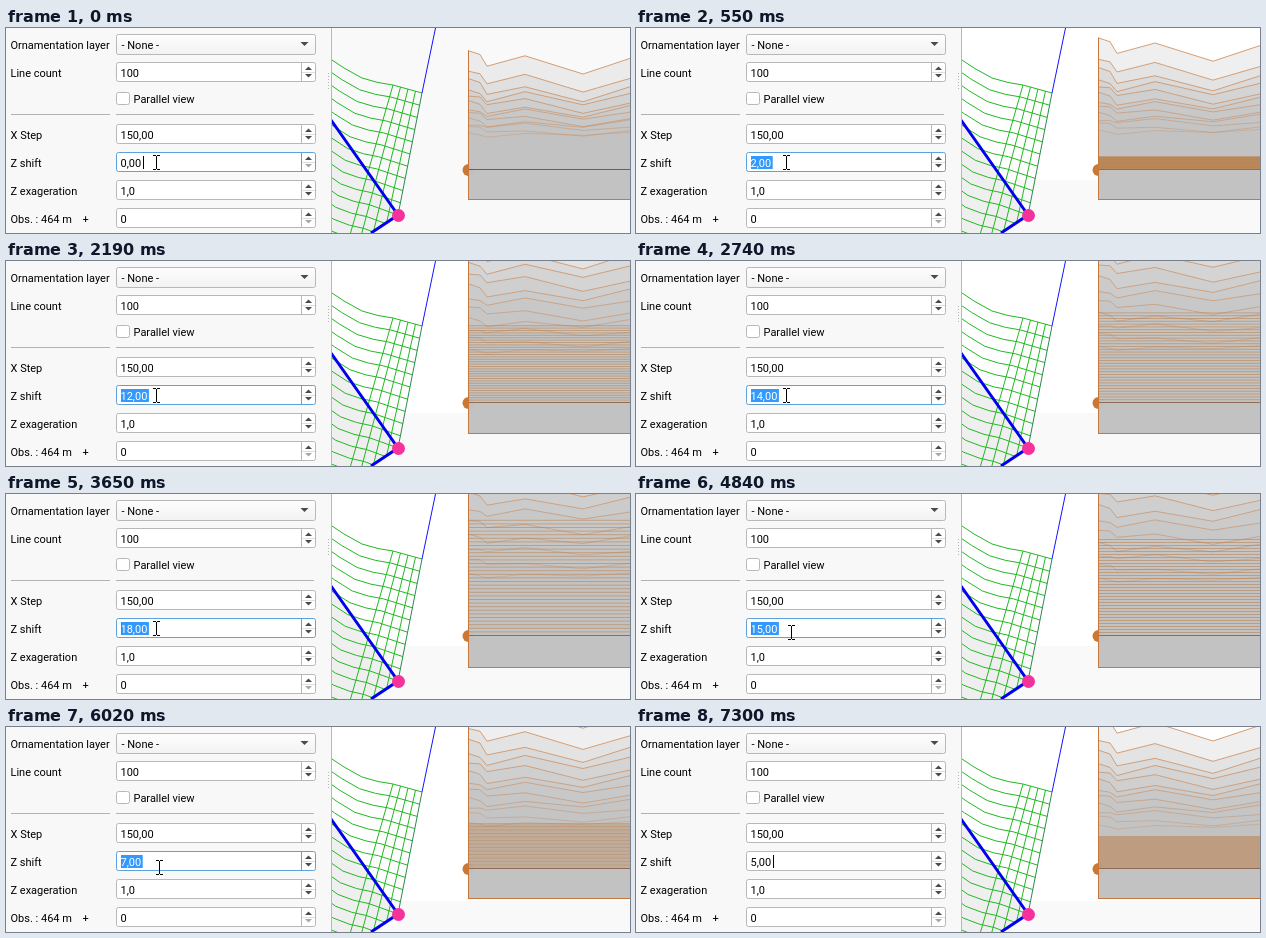
Recreate the animation shown at these times as an HTML page with a canvas. Size 624 by 205 pixels, loop 7400 ms.

```html
<!DOCTYPE html>
<html lang="en">
<head>
<meta charset="utf-8">
<title>Z shift</title>
<style>
html, body { margin: 0; width: 100%; height: 100%; overflow: hidden; background: #f8f8f8; }
canvas { display: block; width: 624px; height: 205px; }
</style>
</head>
<body>
<canvas id="stage" width="624" height="205"></canvas>
<script>
const ctx = document.getElementById('stage').getContext('2d');
const LOOP = 7400;
const TICK = 90;
const ORANGE = '#c8783c';
const GREEN = '#22b822';
const BORDER = '#b8b8b8';
const SEA = 141;

// Wheel bursts: start, end, value reached
const bursts = [
  [370, 640, 4], [1010, 1280, 8], [1370, 1730, 12], [2380, 2830, 15],
  [2830, 3280, 18], [4300, 4570, 16], [4660, 5020, 13], [5110, 5290, 11],
  [5380, 5560, 8], [5930, 6200, 5]
];
const pointer = [[0, 150, 134], [4210, 155, 135], [4750, 155, 138], [6020, 153, 140], [6470, 190, 169]];

function shiftAt(t) {
  let value = 0;
  for (const [start, end, to] of bursts) {
    if (t < start) break;
    const p = Math.min(1, Math.floor((t - start) / TICK) * TICK / (end - start));
    const v = value + (to - value) * p;
    value = to > value ? Math.floor(v + 1e-6) : Math.ceil(v - 1e-6);
  }
  return value;
}

// The caret blinks anew after each burst
function caretOn(t) {
  const last = bursts.reduce((v, [, end]) => (t >= end ? end : v), -360);
  return (t - last) % 1060 < 450;
}

// Ridges from far to near: lower, flatter and nearer rows
const profile = [[462, 0.1], [474, 0.25], [481, 0.7], [519, 0.3], [577, 1], [624, 0.4]];
const ridges = Array.from({ length: 12 }, (_, j) => {
  const u = j / 11;
  const top = 20 + 84 * u ** 0.6;
  const relief = 26 - 21 * u;
  const line = profile.map(([x, s], i) => [x, top + relief * s + Math.sin(j * 2.3 + i) * Math.min(j, 2)]);
  return { line, row: 32 - 25 * u };
});

function rect(x, y, w, h, color) {
  ctx.fillStyle = color;
  ctx.fillRect(x, y, w, h);
}

function path(points, close) {
  ctx.beginPath();
  points.forEach(([x, y]) => ctx.lineTo(x, y));
  if (close) ctx.closePath();
}

function stroke(points, color, width = 1) {
  path(points);
  ctx.strokeStyle = color;
  ctx.lineWidth = width;
  ctx.stroke();
}

function fill(points, color) {
  path(points, true);
  ctx.fillStyle = color;
  ctx.fill();
}

function dot(x, y, r, color) {
  ctx.beginPath();
  ctx.arc(x, y, r, 0, Math.PI * 2);
  ctx.fillStyle = color;
  ctx.fill();
}

function text(str, x, y, color = '#000') {
  ctx.font = '11px Roboto, Arial, sans-serif';
  ctx.fillStyle = color;
  ctx.fillText(str, x, y);
}

function box(x, y, w, h, border = BORDER, back = '#fff') {
  ctx.beginPath();
  ctx.roundRect(x + 0.5, y + 0.5, w - 1, h - 1, 2);
  ctx.fillStyle = back;
  ctx.fill();
  ctx.strokeStyle = border;
  ctx.lineWidth = 1;
  ctx.stroke();
}

function arrow(x, y, half, dir, color = '#4a4a4a') {
  fill([[x - half, y], [x + half, y], [x, y + dir * half]], color);
}

function spin(label, y, value, focus, atMin) {
  const border = focus ? '#5da2dc' : BORDER;
  text(label, 4.5, y + 15);
  box(110, y, 200, 20, border);
  rect(295, y + 1, 1, 18, border);
  rect(296, y + 10, 13, 1, '#dedede');
  arrow(302.5, y + 8, 3.5, -1);
  arrow(302.5, y + 12, 3.5, 1, atMin ? '#a8a8a8' : '#4a4a4a');
  text(value, 114.5, y + 15);
}

function drawForm(t, shift) {
  rect(0, 0, 325, 205, '#f8f8f8');
  rect(325, 0, 1, 205, '#b8b8b8');
  for (let y = 45; y < 61; y += 3) rect(322, y, 1, 1, '#b4b4b4');

  text('Ornamentation layer', 4.5, 21);
  const shade = ctx.createLinearGradient(0, 6, 0, 27);
  shade.addColorStop(0, '#fefefe');
  shade.addColorStop(1, '#f2f2f2');
  box(110, 6, 200, 21, BORDER, shade);
  text('- None -', 115.5, 21);
  arrow(298.5, 14, 4, 1);

  spin('Line count', 34, '100');
  box(110, 64, 14, 13);
  text('Parallel view', 127.5, 75);
  rect(5, 86, 99, 1, '#b2b2b2');
  rect(110, 86, 198, 1, '#b2b2b2');

  spin('X Step', 96, '150,00');
  spin('Z shift', 124, '', t < 7300, shift === 0);
  drawShift(t, shift + ',00');
  spin('Z exageration', 152, '1,0');
  spin('Obs. : 464 m', 180, '0', false, true);
  text('+', 76.5, 195);
}

function drawShift(t, value) {
  const selected = t >= 460 && t < 7300;
  if (selected) rect(115, 128, ctx.measureText(value).width + 1, 13, '#3399ff');
  text(value, 114.5, 139, selected ? '#fff' : '#000');
  if (caretOn(t)) rect(selected ? 115 : 137, 128, 1, 13, selected ? '#cc6600' : '#000');
}

function drawGrid() {
  ctx.save();
  path([[326, 0], [326, 205], [365, 205], [392, 187], [417, 65], [429, 0]], true);
  ctx.clip();
  // One arc repeated down the right edge, growing steeper
  for (let i = 0; i < 15; i++) {
    const dx = -2.4 * i;
    const dy = 12.2 * i;
    const sag = 1 + 0.03 * i;
    stroke([[300, -52], [326, -33], [338, -25], [356, -15], [372, -10.5], [387, -8], [416, 0]]
      .map(([x, y]) => [x + dx, 65 + dy + y * sag]), GREEN);
  }
  for (let x = 387, n = 0; n < 4; n++, x += 7.5) {
    const y = 57 + n * 2;
    const slope = 0.2 + 0.003 * (416 - x);
    stroke([[x, y], [x - slope * (205 - y), 205]], GREEN);
  }
  ctx.restore();
}

function drawMap(t) {
  const white = t < 460 ? 0 : t < 4930 ? 152 : 174;
  rect(326, 0, 298, 205, '#f9f9f9');
  rect(326, 0, 298, white, '#fff');
  fill([[326, 93], [392, 187], [365, 205], [326, 205]], '#efefef');
  drawGrid();
  stroke([[416, 65], [392, 187]], '#2c8a50');
  stroke([[429.5, 0], [416, 65]], '#1414ff');
  stroke([[325, 92], [392, 187], [365, 205]], '#0000ee', 3);
  dot(392.5, 187.5, 6.5, '#f5329b');
}

function drawProfile(shift) {
  const bottom = 171 + Math.floor(shift / 7.5);
  const lift = 0.2 * shift;
  const lines = ridges.map(r => r.line.map(([x, y]) => [x, y - r.row * lift]));

  dot(462.5, 142, 6, '#cc7832');
  ctx.save();
  ctx.beginPath();
  ctx.rect(462, 0, 162, 205);
  ctx.clip();
  lines.forEach(l => fill([...l, [624, bottom], [462, bottom]], 'rgba(190,190,190,.25)'));

  ctx.globalAlpha = 0.5;
  const rows = shift ? 33 : 1;
  for (let k = 0; k < rows; k++) rect(462, SEA - k * lift, 162, 1, '#b9783f');
  lines.forEach((l, j) => {
    ctx.globalAlpha = 0.7 - 0.04 * j;
    stroke(l, ORANGE);
  });
  ctx.globalAlpha = 1;
  rect(462, SEA, 162, 1, shift ? '#8f6c53' : '#6e5e54');
  const top = Math.max(0, lines[0][0][1]);
  rect(462, top, 1, bottom - top, ORANGE);
  rect(462, bottom, 162, 1, ORANGE);
  ctx.restore();
}

function drawPointer(t) {
  if (t >= 6560) return;
  const [, x, y] = pointer.findLast(p => t >= p[0]);
  rect(x, y - 6, 1, 13, '#000');
  for (const d of [-7, 7]) {
    rect(x - 3, y + d, 3, 1, '#000');
    rect(x + 1, y + d, 3, 1, '#000');
  }
}

const start = performance.now();
function frame() {
  const t = Math.max(0, performance.now() - start) % LOOP;
  const shift = shiftAt(t);
  drawMap(t);
  drawProfile(shift);
  drawForm(t, shift);
  drawPointer(t);
  requestAnimationFrame(frame);
}
frame();
</script>
</body>
</html>
```
